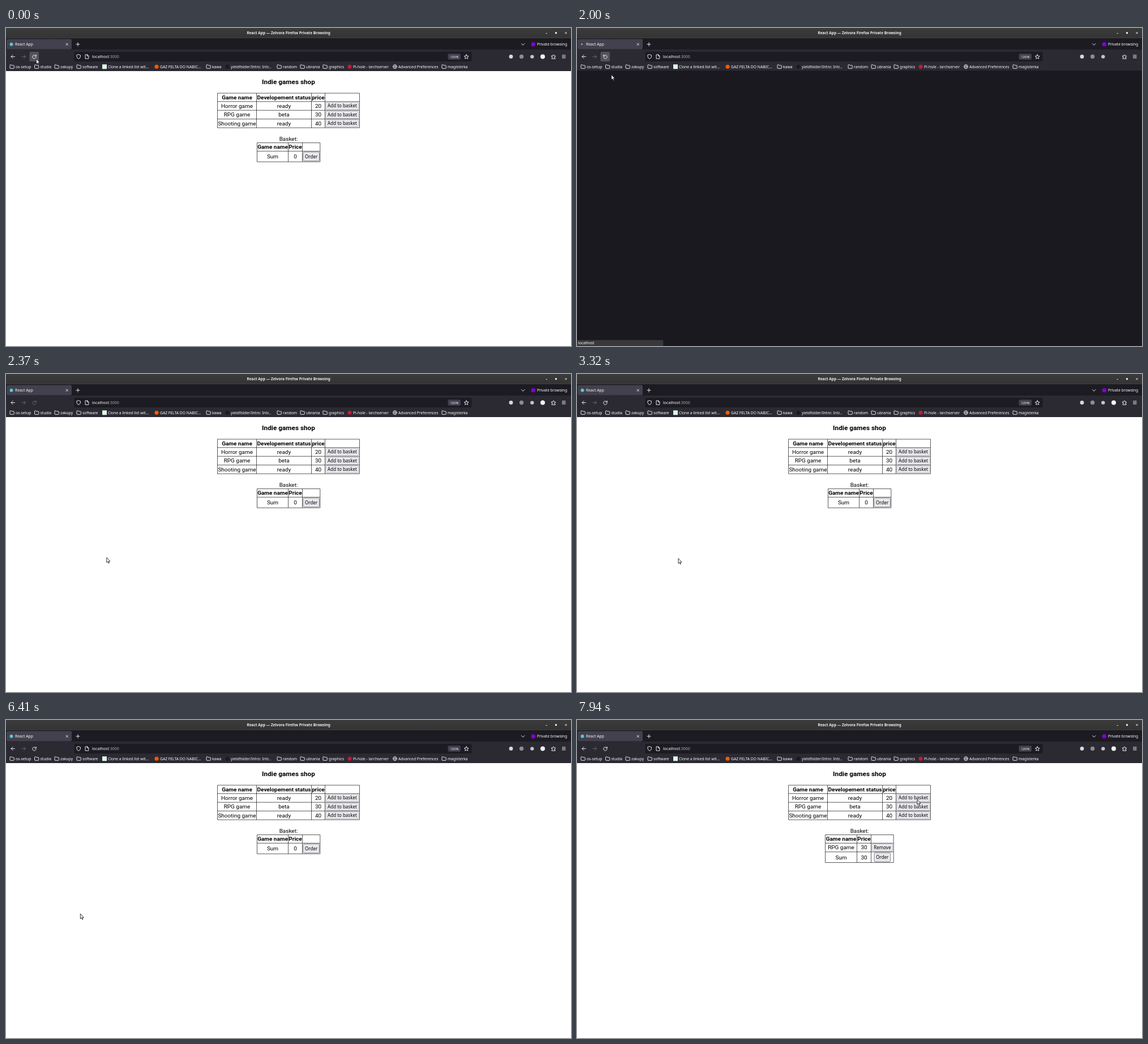
These frames come from a looping animation (998 by 561 pixels, 8000 ms). An HTML page:

```html
<!DOCTYPE html>
<html lang="en">
<head>
<meta charset="utf-8">
<title>React App</title>
<style>
html, body { margin: 0; width: 100%; height: 100%; overflow: hidden; background: #fff; }
svg { display: block; width: 998px; height: 561px; }
text { white-space: pre; }
.ui { font: 6.75px "Noto Sans", "Open Sans", sans-serif; fill: #fbfbfe; }
.page { font: 9.98px Roboto, sans-serif; fill: #000; text-anchor: middle; }
.page .bold { font-weight: 700; }
.btn text { font: 8px "Noto Sans", "Open Sans", sans-serif; }
.btn rect { fill: #e9e9ed; stroke: #8f8f9d; stroke-width: .6; }
.btn.strong rect { stroke: #3c3c44; }
.btn.active rect { fill: #b1b1b9; }
.grid { fill: none; stroke: #000; stroke-width: .65; }
.icon { fill: none; stroke: #fbfbfe; stroke-width: .9; stroke-linecap: round; stroke-linejoin: round; }
.dim { stroke: #6c6b74; }
</style>
</head>
<body>
<svg viewBox="0 0 998 561" xmlns="http://www.w3.org/2000/svg">
  <defs>
    <linearGradient id="bar" x2="0" y2="1">
      <stop stop-color="#3b3b3b"/><stop offset="1" stop-color="#343434"/>
    </linearGradient>
    <path id="folder" d="M.5 1.4Q.5.6 1.2.6H3L4 1.7H7Q7.8 1.7 7.8 2.5V6.2Q7.8 7 7 7H1.3Q.5 7 .5 6.2Z"/>
    <path id="reload" d="M2.6-1.8A3.2 3.2 0 1 0 3.2.6M3.3-3.4V-1H.9"/>
  </defs>

  <rect width="998" height="561" fill="#fff"/>

  <g class="page" data-hide="2000-2200">
    <text class="bold" x="499" y="99" style="font-size:11.8px">Indie games shop</text>
    <g id="shop"></g>
    <text x="499" y="199">Basket:</text>
    <g id="empty" data-hide="7380-8000"></g>
    <g id="filled" data-show="7380-8000"></g>
  </g>

  <rect data-show="2000-2060" y="75" width="998" height="486" fill="#1a191f"/>
  <g data-show="2000-2200">
    <path d="M0 550.5H151Q152.4 550.5 152.4 552V561H0Z" fill="#38383d"/>
    <text class="ui" x="2" y="558.3">localhost</text>
  </g>

  <rect width="998" height="17.2" fill="url(#bar)"/>
  <rect y="17.2" width="998" height="21" fill="#1c1b22"/>
  <rect y="38" width="998" height="37.9" fill="#2b2a33"/>
  <rect y="75.4" width="998" height=".5" fill="#111016"/>
  <rect x="1" y="19.5" width="115" height="18" rx="2" fill="#42414d"/>
  <rect x="120.5" y="42" width="702" height="17" rx="2" fill="#1c1b22"/>
  <rect x="780.5" y="45.2" width="22.5" height="10.6" rx="2" fill="#42414d"/>

  <g class="ui">
    <text x="499.2" y="11.4" text-anchor="middle" style="font-size:6.5px;font-weight:700;fill:#eee">React App — Zelvora Firefox Private Browsing</text>
    <text x="16" y="31.3">React App</text>
    <text x="938" y="31.3">Private browsing</text>
    <text x="152" y="53.1" style="font-size:7.05px">localhost<tspan fill="#a9a9b0">:3000</tspan></text>
    <text x="791.8" y="52.8" text-anchor="middle" style="font-size:6px">120%</text>
    <g id="bookmarks"></g>
  </g>

  <g fill="#eee">
    <rect x="953.6" y="9" width="2.2" height="1"/>
    <rect x="970" y="7.2" width="3" height="3"/>
    <path d="M987.5 7.2l3 3m0-3l-3 3" stroke="#eee"/>
  </g>

  <circle data-hide="1930-2300" cx="9.5" cy="28.7" r="3" fill="#58c4dc"/>
  <circle id="dot" data-show="1930-2300" cy="28.6" r="1.2" fill="#d4d4da"/>
  <circle cx="931.3" cy="28.8" r="3.8" fill="#8000d7"/>

  <rect data-hide="2060-8000" x="41.5" y="42" width="16.5" height="17" rx="2" fill="#52525e"/>
  <g class="icon">
    <path d="M106 27l3.4 3.4m0-3.4l-3.4 3.4M127 25.6v6.2m-3.1-3.1h6.2M910.4 27.5l2.8 2.8 2.8-2.8"/>
    <path d="M15.5 50.5H9m3-3l-3 3 3 3"/>
    <path class="dim" d="M28 50.5h6.5m-3-3l3 3-3 3"/>
    <g transform="translate(50 50.8)">
      <use href="#reload" data-hide="2000-2490"/>
      <use href="#reload" data-show="2000-2060" transform="scale(-1 1)"/>
      <path data-show="2060-2180" d="M-2-2L2 2"/>
      <path data-show="2180-2330" d="M-2.6-2.6L2.6 2.6M2.6-2.6L-2.6 2.6"/>
      <use class="dim" href="#reload" data-show="2330-2770"/>
    </g>
    <path d="M128.2 46.8l3.3 1.2v2.2q0 2.8-3.3 4.2-3.3-1.4-3.3-4.2V48Z"/>
    <path d="M140.4 47h3.3l2.2 2.2v4.9h-5.5ZM143.5 47v2.4h2.4"/>
    <path id="star"/>
    <path d="M964 49h2v-.6a1.1 1.1 0 0 1 2.2 0v.6h2v2h-.7a1.1 1.1 0 0 0 0 2.2h.7v1h-6.2v-1.6h.5a1 1 0 0 0 0-2h-.5Z"/>
    <path d="M982.5 48h5.6m-5.6 2.4h5.6m-5.6 2.4h5.6"/>
  </g>
  <circle cx="892" cy="50.4" r="3.4" fill="#d8d8dd"/>
  <circle cx="910.6" cy="50.4" r="3.7" fill="#8b8b92"/>
  <circle cx="929.3" cy="50.6" r="3.2" fill="#c4c4ca"/>
  <circle data-hide="2000-2300" cx="948" cy="50.4" r="4" fill="#f4f4f6"/>
  <circle data-show="2060-2300" cx="948" cy="50.4" r="4" fill="#e37151"/>

  <g data-show="410-1930">
    <rect x="53.5" y="65.5" width="100" height="18" rx="2" fill="#2f2f2f" stroke="#4a4a4a" stroke-width=".6"/>
    <text class="ui" x="103.5" y="77" text-anchor="middle">Reload current page (Ctrl+R)</text>
  </g>

  <path id="cursor" d="M.5.4V9.2L2.5 7.4 3.9 10.5 5.2 9.9 3.9 6.9H6.5Z" fill="#fff" stroke-width=".8" stroke-linejoin="round"/>
</svg>

<script>
const LOOP = 8000;
const ROW = 15.4;
const $ = id => document.getElementById(id);

const label = (x, y, s, cls = '') => `<text class="${cls}" x="${x}" y="${y}">${s}</text>`;

function grid(xs, ys) {
  const [left, right, top, bottom] = [xs[0], xs.at(-1), ys[0], ys.at(-1)];
  const d = xs.map(x => `M${x} ${top}V${bottom}`).join('') +
            ys.map(y => `M${left} ${y}H${right}`).join('');
  return `<path class="grid" d="${d}"/>`;
}

function button(cx, cy, w, h, s, cls = '') {
  return `<g class="btn ${cls}"><rect x="${cx - w / 2}" y="${cy - h / 2}" width="${w}" height="${h}" rx="1.6"/>` +
    label(cx, cy + 2.8, s) + '</g>';
}

// The last column holds one button per body row; order rows are taller.
function table(top, xs, rows) {
  const ys = [top, top + 14.8];
  rows.slice(1).forEach(row => ys.push(ys.at(-1) + (row.at(-1) === 'Order' ? 18.8 : ROW)));
  const cells = rows.map((row, r) => row.map((s, c) => {
    const cx = (xs[c] + xs[c + 1]) / 2, cy = (ys[r] + ys[r + 1]) / 2;
    if (c < xs.length - 2) return label(cx, cy + 3.4, s, r ? '' : 'bold');
    if (s === 'Order') return button(cx, cy, 28.6, 15.8, s, 'strong');
    return button(cx, cy, xs[c + 1] - xs[c] - 3, 12.7, s);
  }).join(''));
  return grid(xs, ys) + cells.join('');
}

const add = 'Add to basket', head = ['Game name', 'Price'];
$('shop').innerHTML = table(115, [373.5, 442.5, 539.5, 563.5, 624.5], [
  ['Game name', 'Developement status', 'price'],
  ['Horror game', 'ready', 20, add],
  ['RPG game', 'beta', 30, add],
  ['Shooting game', 'ready', 40, add],
]);
$('empty').innerHTML = table(202.5, [443.5, 498.5, 523.5, 554.8], [head, ['Sum', 0, 'Order']]);
$('filled').innerHTML = table(202.5, [438.5, 494.5, 519.5, 559.2],
  [head, ['RPG game', 30, 'Remove'], ['Sum', 30, 'Order']]);

const folder = x => `<use class="icon" href="#folder" x="${x - 4.5}" y="64.3"/>`;
const disc = color => x => `<circle cx="${x}" cy="68.2" r="3.5" fill="${color}"/>`;
const square = color => x => `<rect x="${x - 4}" y="64.2" width="8" height="8" fill="${color}"/>`;
const globe = x => `<g class="icon" style="stroke-width:.7"><circle cx="${x}" cy="68.2" r="3.5"/>` +
  `<ellipse cx="${x}" cy="68.2" rx="1.5" ry="3.5"/><path d="M${x - 3.5} 68.2h7"/></g>`;

$('bookmarks').innerHTML = [
  [17, 'os-setup'], [60.5, 'studia'], [96, 'zakupy'], [135, 'software'],
  [180, 'Clone a linked list wit…', square('#e4f3e8')],
  [272, 'GAZ FELTA DO NABIC…', disc('#ff5a00')], [364, 'kawa'],
  [397, 'yieldfolder/Intro: Intr…', disc('#1b1a20')],
  [489, 'random'], [530, 'ubrania'], [570, 'graphics'],
  [613, 'Pi-hole - larchserver', disc('#c51a3b')],
  [693, 'Advanced Preferences', globe], [780, 'magisterka'],
].map(([x, s, icon = folder]) => icon(x - 6) + label(x, 70.6, s)).join('');

$('star').setAttribute('d', 'M' + Array.from({ length: 10 }, (_, i) => {
  const a = i * Math.PI / 5, r = i % 2 ? 1.9 : 4.1;
  return `${813.2 + r * Math.sin(a)} ${50.9 - r * Math.cos(a)}`;
}).join('L') + 'Z');

const easeOut = p => 1 - (1 - p) ** 3;
const smooth = p => p * p * (3 - 2 * p);

// Pointer moves: evenly spaced hard steps, optionally bent by two control points.
const home = [53, 54];
const moves = [
  { at: 1930, to: [52, 54] },
  { at: 2000, to: [60.3, 82] },
  { at: 2060, to: [126.5, 257.3] },
  { at: 2120, end: 2490, steps: 7, to: [178.5, 325], ease: easeOut },
  { at: 3530, end: 3690, steps: 5, to: [162, 337], bend: [[178, 345], [170, 349]] },
  { at: 3890, end: 4090, steps: 6, to: [131, 335.5] },
  { at: 5030, to: [130.5, 335] },
  { at: 6410, end: 7060, steps: 16, to: [602, 152], bend: [[130, 534], [1100, -31]], ease: smooth },
  { at: 7600, end: 7940, steps: 7, to: [600.5, 140] },
];

function bezier(a, b, c, d, p) {
  const q = 1 - p;
  return q ** 3 * a + 3 * q * q * p * b + 3 * q * p * p * c + p ** 3 * d;
}

function pointer(t) {
  let pos = home;
  for (const { at, end = at + 1, steps = 1, to, bend, ease = p => p } of moves) {
    if (t < at) break;
    const gap = (end - at) / Math.max(1, steps - 1);
    const p = ease(Math.min(1, (1 + Math.floor((t - at) / gap)) / steps));
    pos = pos.map((v, i) => bend
      ? bezier(v, bend[0][i], bend[1][i], to[i], p)
      : v + (to[i] - v) * p);
  }
  return pos;
}

const timed = [...document.querySelectorAll('[data-show], [data-hide]')].map(el => {
  const [from, to] = (el.dataset.show || el.dataset.hide).split('-').map(Number);
  return { el, from, to, show: 'show' in el.dataset };
});
const rpgButton = $('shop').querySelectorAll('.btn')[1];

function draw(t) {
  for (const { el, from, to, show } of timed) {
    el.style.display = (t >= from && t < to) === show ? '' : 'none';
  }
  const [x, y] = pointer(t);
  const onPage = y > 82;
  $('cursor').setAttribute('transform', `translate(${x} ${y})`);
  $('cursor').setAttribute('stroke', onPage ? '#000' : '#1c1b22');
  $('dot').setAttribute('cx', 6 + 7 * Math.abs(Math.sin((t - 1930) / 185)));
  rpgButton.classList.toggle('active', t >= 7280 && t < 7380);
}

const start = performance.now();
function tick() {
  draw((performance.now() - start) % LOOP);
  requestAnimationFrame(tick);
}
tick();
</script>
</body>
</html>
```
